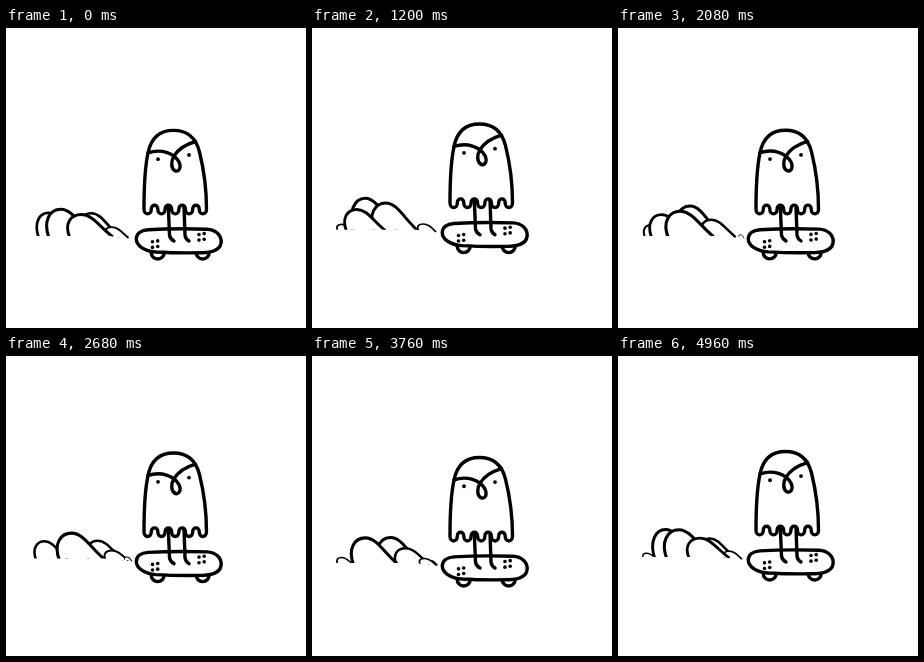
Animation of 300x300 px, one loop 5 s. Source, as an HTML page:

```html
<!DOCTYPE html>
<html lang="en">
<head>
<meta charset="utf-8">
<title>Skating ghost</title>
<style>
  html, body { margin: 0; width: 100%; height: 100%; overflow: hidden; background: #fff; }
  svg { display: block; width: 100%; height: 100%; }
  path { fill: #fff; stroke: #000; stroke-width: 3.4; stroke-linejoin: round; }
  .skater path { stroke-linecap: round; }
  path.line { fill: none; }
</style>
</head>
<body>
<svg viewBox="0 0 300 300">
  <clipPath id="ground"><polygon points="0,0 300,0 300,220 126,205 104,201 0,201"/></clipPath>
  <g id="rider">
    <g id="dust" clip-path="url(#ground)"></g>
    <g class="skater">
      <path d="M145.2 217.5a6.5 6.5 0 0 0 13 0M190.2 217.5a6.5 6.5 0 0 0 13 0"/>
      <path d="M142 194.8C160 193.7 185 193.7 201 194.2C210 194.8 215.2 200 215.2 206.5C215 213.5 208 217.3 197 217.7C180 218 160 217.6 150 217C138 216 130.3 210.5 130.3 204C130.3 198.5 135 195.3 142 194.8Z"/>
      <path class="line" d="M162.3 171L163.5 200Q164 204 168 206M178 171L179 200Q179.5 204 183 206"/>
      <path id="body"/>
      <path class="line" d="M142 117.8C155 113.5 168 118 173 127C176 134 172 136.5 169.5 136C165 134 164.5 127 168 121C173 113 181 109 189.5 106.5"/>
      <g id="dots"></g>
    </g>
  </g>
</svg>
<script>
const SVG = 'http://www.w3.org/2000/svg';
const byId = id => document.getElementById(id);
const add = (parent, tag, attrs = {}) => {
  const node = parent.appendChild(document.createElementNS(SVG, tag));
  for (const key in attrs) node.setAttribute(key, attrs[key]);
  return node;
};

// Five drips with four rounded gaps, right to left
const hem = Array(5).fill('c0 6.5 -7.3 6.5 -7.3 0').join('c0 -5 -6.5 -5 -6.5 0');
byId('body').setAttribute('d',
  `M138 174C138 150 139 132 142 118C145 103 154 95.4 167.5 95.4C181 95.4 190 103 193.5 117C197.5 133 200.5 152 200.5 174${hem}Z`);

const dot = (cx, cy, r) => add(byId('dots'), 'circle', { cx, cy, r });
dot(152, 124.2, 1.9);
dot(183, 120, 1.9);
for (const [x, y] of [[146.5, 206.8], [193, 199.5]])
  for (const dx of [0, 5.2])
    for (const dy of [0, 5.6]) dot(x + dx, y + dy - dx * 0.17, 1.8);

// Start of each puff within the one-second cycle, back to front; rear ones are taller
const CYCLE = 1000, LIFE = 740, GROUND = 200;
const puffs = [690, 410, 820, 60, 500, 250, 630].map((start, i) => ({
  start, size: 31.5 - 1.3 * i, node: add(byId('dust'), 'path')
}));

// A puff rises at the tail of the board, rolls left and sinks
function drawPuff({ start, size, node }, time) {
  const s = (time - start + CYCLE) % CYCLE / LIFE;
  if (s >= 0.97) return node.setAttribute('d', '');
  const lift = Math.sin(Math.PI * s ** 1.5) ** 1.3;
  const left = 73 + 48.5 * Math.cos(Math.PI * s ** 0.8);
  const right = 126 - 97 * s ** 2.35;
  const w = right - left, h = size * lift;
  const top = GROUND - h, peak = left + w * 0.3;
  const foot = GROUND + Math.max(2, (right - 104) * 0.16);
  node.setAttribute('d',
    `M${left + w * 0.04} ${GROUND + 2}C${left - w * 0.08} ${top + h * 0.45} ${left + w * 0.06} ${top} ${peak} ${top}` +
    `C${peak + w * 0.25} ${top} ${peak + w * 0.4} ${top + h * 0.6} ${right} ${foot}`);
  node.style.strokeWidth = 0.7 + 2.4 * Math.sqrt(lift);
}

function draw(now) {
  const time = Math.floor(now % 5000 / 40) * 40;
  const bob = 3.5 + 3.5 * Math.cos(time * Math.PI / 1000);
  byId('rider').setAttribute('transform', `translate(0 ${bob})`);
  puffs.forEach(puff => drawPuff(puff, time % CYCLE));
}

const begin = performance.now();
function tick() {
  draw(performance.now() - begin);
  requestAnimationFrame(tick);
}
tick();
</script>
</body>
</html>
```
